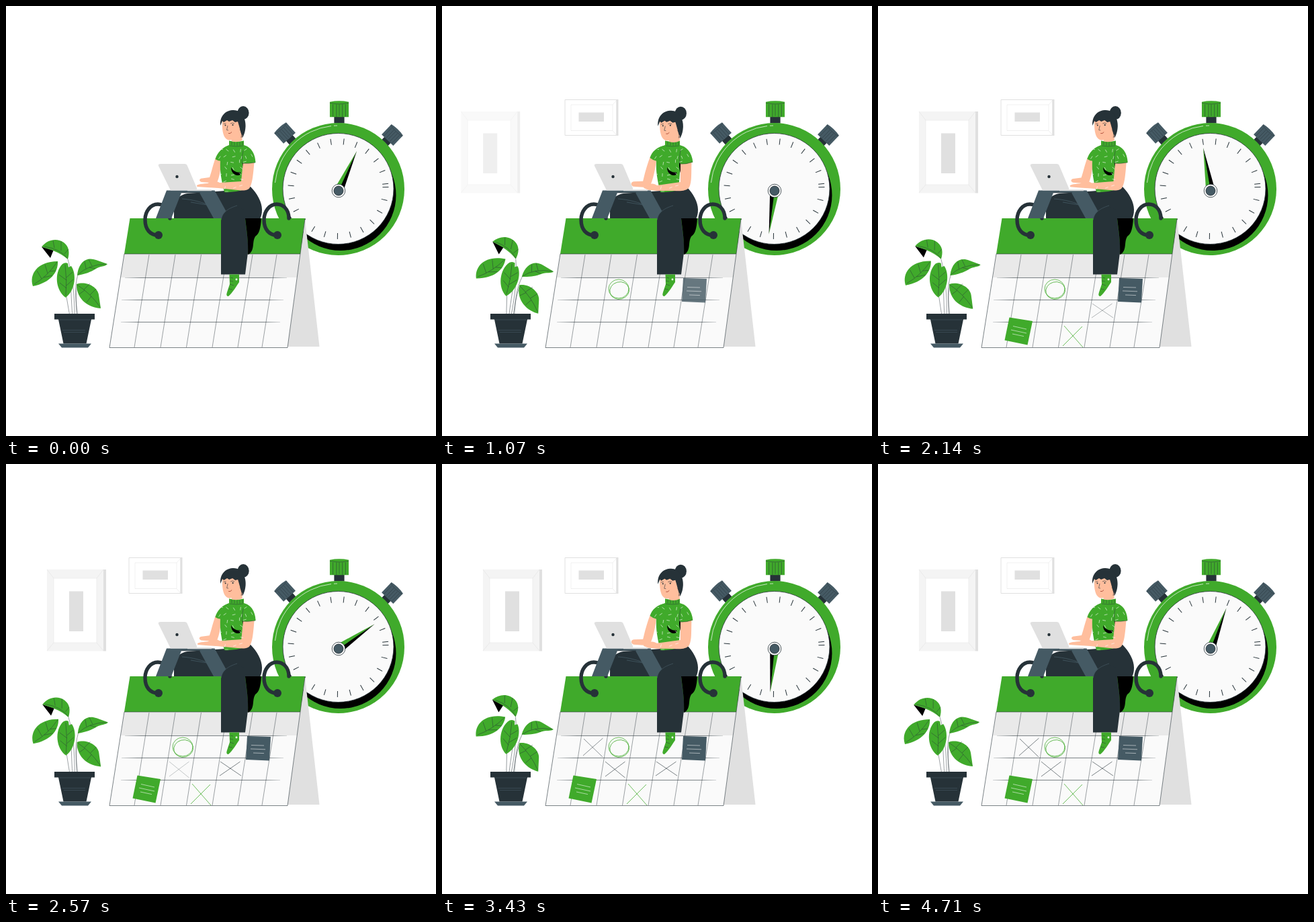
Animation, 640 px wide and 640 px high, one loop 4.78 s. Source, as an HTML page:

```html
<!DOCTYPE html>
<html lang="en">
<head>
<meta charset="utf-8">
<title>Planning the week</title>
<style>
html, body { margin: 0; width: 100%; height: 100%; overflow: hidden; background: #fff; }
svg { display: block; width: 100%; height: 100%; }
.green { fill: #40aa2b; }
.dark { fill: #263238; }
.slate { fill: #455a64; }
.skin { fill: #ffbe9d; }
.grey { fill: #e0e0e0; }
.line { fill: none; stroke: #263238; stroke-width: .6; }
.thin { fill: none; stroke: #263238; stroke-width: .45; }
.pen { fill: none; stroke: #40aa2b; stroke-width: .75; }
.white { fill: none; stroke: #fff; stroke-width: .7; }
.pale { fill: none; stroke: #e0e0e0; stroke-width: .8; }
.ring { fill: none; stroke: #263238; stroke-width: 5.4; stroke-linecap: round; }
</style>
</head>
<body>
<svg viewBox="0 0 640 640">
  <defs>
    <g id="cap">
      <path class="dark" d="M-6.5 8h13v11h-13z"/>
      <path d="M-12-10.500Q0-13 12-10.500V10.500H-12z"/>
      <path class="thin" d="M-12-9Q0-6 12-9M-8-7V10M-3.500-7V10.500M0-7V9M4-7V10.500M8-7V10"/>
    </g>
    <g id="hook">
      <path class="ring" d="M421 316C421 302 412 295 403 295C392 295 384 306 384 318C384 333 392 341 403 341"/>
      <circle class="dark" cx="404" cy="341" r="6"/>
    </g>
    <clipPath id="shirtClip"><path d="M332 207C322 210 314 219 312 228L319 231C318 246 321 262 325 277L352 274L355 234L371 232C371 222 367 211 354 207z"/></clipPath>
    <linearGradient id="rule"><stop offset="0" stop-color="#263238" stop-opacity=".3"/><stop offset=".1" stop-color="#263238"/><stop offset=".9" stop-color="#263238"/><stop offset="1" stop-color="#263238" stop-opacity=".3"/></linearGradient>
  </defs>

  <g id="tall">
    <path fill="#f4f4f4" d="M61 157h84v121.500h-84z"/>
    <path class="grey" d="M145 157h4v121.500h-4z"/>
    <path class="pale" stroke-opacity=".7" d="M61 157l10 13M145 157l-10 13M61 278l10-12M145 278l-10-12"/>
    <path fill="#fff" stroke="#ebebeb" stroke-width=".8" d="M71 170h64v96h-64z"/>
    <path class="grey" d="M94 189.500h21v59.500h-21z"/>
  </g>
  <g id="wide">
    <path fill="#fff" stroke="#e0e0e0" d="M183 139.500h77v53h-77z"/>
    <path class="grey" d="M259.500 139h3v54h-3z"/>
    <path class="pale" stroke-opacity=".6" d="M192 147h62v38.500h-62zM254 147l6-7M254 185.500l6 7"/>
    <path class="grey" d="M203.500 158.500h37.500v13.500h-37.500z"/>
  </g>

  <g id="watch">
    <use href="#cap" class="green" transform="translate(496 154) scale(1.17 1.08)"/>
    <use href="#cap" class="slate" transform="translate(415 189) rotate(-42)"/>
    <use href="#cap" class="slate" transform="translate(575 192) rotate(44)"/>
    <circle class="green" cx="494.500" cy="272.500" r="98.500"/>
    <path class="white" d="M400.500 263A94.500 94.500 0 0 1 484 178.600M488 178.200l5-.2"/>
    <circle cx="498" cy="281.500" r="82.500"/>
    <circle cx="494.500" cy="272" r="82.500" fill="#fafafa" stroke="#263238" stroke-width=".8"/>
    <g id="ticks" stroke="#263238" stroke-width="1"></g>
    <g id="hand">
      <path class="green" d="M0-65L-6.500-3H1z"/>
      <path d="M0-65L6.500-3H0z"/>
    </g>
    <circle cx="495" cy="275" r="9.800" fill="#fff" stroke="#263238" stroke-width=".8"/>
    <circle class="slate" cx="495" cy="275" r="7" stroke="#263238" stroke-width=".9"/>
  </g>

  <g id="calendar">
    <path class="grey" d="M445 317L466.500 507H419z"/>
    <path fill="#fafafa" d="M176 369H438L419 508.500H154z"/>
    <path fill="#e9e9e9" d="M176 369H438L433 404H171z"/>
    <path class="green" d="M184.500 316H445L438 369H176z"/>
    <path class="line" d="M176 369H438M445 317L419 508.500H154L176 369"/>
    <g id="grid" class="thin"></g>
  </g>

  <g id="ring">
    <ellipse class="pen" cx="263" cy="421" rx="15" ry="14"/>
    <ellipse class="pen" cx="264" cy="423.500" rx="14.500" ry="12.800" transform="rotate(-15 264 423)"/>
  </g>
  <g id="slateNote">
    <path class="slate" d="M359 405L394 406L392 441.500L357 440z"/>
    <path class="white" stroke-opacity=".75" d="M365 418.500l19 .5M364 424l22 .8M368 430l16 .6"/>
  </g>
  <g id="greenNote">
    <path class="green" d="M195.500 463.500L230 469L222.500 504.500L188.500 497.500z"/>
    <path class="white" stroke-opacity=".8" d="M201 476.500l20 4.500M198 482l23 5M200 488l17 3.600"/>
  </g>
  <path id="x1" class="pen" d="M277 476L305 508M304 477L275 506"/>
  <path id="x2" class="line" d="M319 443L350 464M348.500 443L318 464"/>
  <path id="x3" class="line" d="M243 443L272.500 467M272.500 443L243 465"/>
  <path id="x4" class="line" d="M211 409L239 436M239.500 408L210 434"/>

  <g id="woman">
    <use href="#hook" x="-177"/>
    <path class="dark" d="M250 316V302C251 288 258 281 270 279L326 275L364 269C374 279 381 292 381 303C381 309 380 313 378 317H356C358 335 361 350 360 367L356 399.500H320V330C320 322 322 318 327 314V316z"/>
    <path d="M356 316H380C379 331 377 339 371 343C367 349 369 358 366 364C364 368 362 369 360 370C361 350 358 334 356 316z"/>
    <path fill="none" stroke="#455a64" stroke-width=".8" d="M262 287C278 288 292 292 309 299M275 292l24 4"/>
    <path class="green" d="M332.500 399.500H347V411C342 418 338 426 331 432Q327 432 329 426L333 414z"/>
    <path class="thin" d="M334 404l4 1M333 409l5 1M333 414l6 2M331 421l6 1"/>
    <circle cx="343" cy="407" r="1.400" fill="#fff"/>
    <path class="slate" d="M239 274.500H310.500L330 310V316H309L288 278H261L246 316H223z"/>
    <path class="dark" opacity=".5" d="M261 277h28v1.500h-28z"/>
    <path class="dark" d="M320 332V320C321 309 328 302 342 298L356 304V332z"/>
    <path fill="none" stroke="#455a64" stroke-width=".7" d="M320.500 318C321 309 328 302 344 297"/>
    <use href="#hook"/>
    <path class="grey" d="M227 238Q226 235 230 235H266Q269 235 270 238L284 271Q285 274 282 274.500H245z"/>
    <path class="grey" d="M270 273h36v2.200h-36z"/>
    <circle class="dark" cx="254.500" cy="254" r="2.200"/>

    <path id="farArm" class="skin"/>
    <path class="green" d="M332 200.500Q343 203 354 200.500V207C362 212 358 228 355 236L352 274Q338 278 325 277C321 262 318 246 319 231C319 219 322 211 332 207z"/>
    <path id="farSleeve" class="green"/>
    <path id="fold"/>
    <path d="M335 240C338 246 343 248 349 247.500C350 251 347 252.500 344 252C338 251 335 246 335 240z"/>
    <path id="nearArm" class="skin"/>
    <path id="nearSleeve" class="green"/>
    <g id="dashes" class="white" stroke-opacity=".85" stroke-linecap="round" clip-path="url(#shirtClip)"></g>
    <path class="thin" d="M336 202v5M340 202.500v5M344 203v5M348 202.500v5M352 202v5M333 208q10 2 20 0"/>
    <path id="sleeveLine" class="thin"/>

    <g id="head">
      <ellipse class="dark" cx="353" cy="159" rx="8.600" ry="10"/>
      <path class="dark" d="M340 156C353 156 357 170 356.500 180C356 188 354 192 352 196L346 192L338 172z"/>
      <path class="skin" d="M322 168C321 183 323 193 327 197C330 200 333 200 335.500 199V201Q343 204 351.500 200V192C349 190 348 182 348 170z"/>
      <path class="dark" d="M319 178C318 163 327 155 339 155C350 155 354 164 355 174L350 188C348 184 347 178 345 172L341 173L337 170L332 172L329 170L324 173L322 171z"/>
      <path class="line" d="M323.500 175.500l4-.8M334 175q3-2 6 0M330 178l-1.500 6.500l2.500 .5M348 184q4 4 2 12"/>
      <path fill="none" stroke="#b5543f" stroke-width="1" d="M331 189.500q3 1 5-2"/>
      <circle class="dark" cx="326.500" cy="177.500" r="1"/>
      <circle class="dark" cx="337.500" cy="177" r="1.100"/>
    </g>
  </g>

  <g id="plant">
    <path class="thin" d="M92 377C99 400 102 430 102 462M90 433L95 462M94 388C97 415 97 440 99 462M107 400C101 420 104 440 107 462M106 415C103 430 105 445 105 462"/>
    <path class="green" d="M53 358.500C62 347 76 345 86 352C94 358 95 367 92 377Q83 369 70 364z"/>
    <path d="M53 358.500L70.500 364L66 375z"/>
    <path class="green" d="M40 417C34 400 46 380 77 380C78 396 66 412 40 417z"/>
    <path class="green" d="M89 434C74 424 71 397 84 384Q88 381 92 383L93 389L97 387C105 398 104 422 89 434z"/>
    <path class="green" d="M106 401C108 380 121 373 134 378L151 384C148 388 140 387 134 391C126 396 118 399 106 401z"/>
    <path class="green" d="M105 414C118 409 136 417 138 430L141 450C125 449 105 439 105 414z"/>
    <path class="thin" d="M92 376Q80 361 57 358M82 364v-14M72 360l-2-11M87 369l6-7M42 414Q62 402 76 381M53 406l-7-12M62 398l-4-13M56 404l13-3M65 395l9-1M89 431Q91 408 88 385M90 420l-10-8M90 408l-11-8M90 416l10-9M90 404l9-8M107 400Q122 385 149 384M119 391l-2-11M128 387l-5-10M124 389l9 2M106 415Q126 428 140 448M116 422l9-9M125 430l9-9M117 423l-8 6M127 432l-7 9"/>
  </g>
  <g id="pot">
    <path class="dark" d="M72 458h60v8.500h-5L119.500 502.500H85.500L78 466.500h-6z"/>
    <path class="slate" d="M78 502.500h49l-5 6H83z"/>
    <path fill="none" stroke="#455a64" stroke-width=".6" d="M84 482.500h34M86 485.500h32M79 467h47"/>
  </g>
</svg>

<script>
const LOOP = 4780, FPS = 14;
const $ = id => document.getElementById(id);
const lineTag = (x1, y1, x2, y2, extra = '') =>
  `<line x1="${x1}" y1="${y1}" x2="${x2}" y2="${y2}" ${extra}/>`;

// Dial marks: the row starts at the right and stops just short of a full turn
const TICKS = 24, FIRST = 88, STEP = 15.48;
$('ticks').innerHTML = Array.from({ length: TICKS }, (_, i) =>
  lineTag(494.5, 197, 494.5, 206, `transform="rotate(${FIRST + i * STEP} 494.5 272)"`)).join('');

// Calendar rules
$('grid').innerHTML =
  [213, 252, 290.5, 329, 367, 403].map(x => lineTag(x, 370, x - 22, 508)).join('') +
  [[177, 418, 404], [172, 413, 437], [171, 408, 470]].map(([a, b, y]) =>
    `<rect x="${a}" y="${y}" width="${b - a}" height=".6" fill="url(#rule)" stroke="none"/>`).join('');

// Knit pattern, one dash per jittered cell
let seed = 7;
const rnd = () => (seed = seed * 16807 % 2147483647) / 2147483647;
let dashes = '';
for (let y = 212; y < 276; y += 9) {
  for (let x = 315; x < 372; x += 10) {
    if (y > 232 && x > 350) continue;
    const a = rnd() * Math.PI, px = x + rnd() * 6, py = y + rnd() * 5;
    const dx = 2 * Math.cos(a), dy = 2 * Math.sin(a);
    dashes += lineTag(px - dx, py - dy, px + dx, py + dy);
  }
}
$('dashes').innerHTML = dashes;

// Paths that blend between two poses
const poses = {
  farArm: [
    'M312 226L320 230C320 245 317 257 313 265L304 263L291 262C287 261 287 257 292 256.500L303 255C306 247 308 236 312 226z',
    'M310 224L319 230C317 245 314 258 310 267L300 270L285 269C281 268 280 262 285 261.500L299 261C302 248 306 234 310 224z'
  ],
  farSleeve: [
    'M334 207C322 209 314 219 311.500 228Q316 231 321 231L328 215z',
    'M334 207C320 209 312 217 309.500 226Q314 230 320 231L328 215z'
  ],
  fold: [
    'M352 233L355 234L354 243Q352 240 352 233z',
    'M353 233L357 235L356 251Q353 245 353 233z'
  ],
  nearArm: [
    'M353 232L369.500 232C368 250 367 262 363 270C360 275 354 275 345 274L316 271L300 270L285 269C282 267 285 265 300 264L308 260C312 260 316 262 318 263L350 261z',
    'M355 232L371.500 232C371 250 372 262 368 270C364 275 356 276 345 275L320 275L308 274L301 271C300 269 301 268 304 267L310 265C314 264 317 265 320 267L355 262z'
  ],
  nearSleeve: [
    'M352 207C364 208 371 219 371.500 233Q361 235 351 234L353 216z',
    'M352 207C364 208 372 218 373.500 232.500Q363 236 354 235L354 216z'
  ],
  sleeveLine: [
    'M353 215Q351 224 351 234Q361 235 371 233',
    'M355 214Q353 224 354 235Q363 236 373 232'
  ]
};
const NUM = /-?\d+(?:\.\d+)?/g;
function blend([from, to], s) {
  const end = to.match(NUM);
  let i = 0;
  return from.replace(NUM, n => (+n + (end[i++] - n) * s).toFixed(2));
}

// id, start ms, duration ms, entry offset x, y
const entries = [
  ['wide', 250, 500, 0, -38.4],
  ['ring', 430, 480, 0, 0],
  ['slateNote', 680, 480, 0, 0],
  ['tall', 820, 500, -66, 0],
  ['greenNote', 1220, 480, 0, 0],
  ['x1', 1600, 480, 0, 0],
  ['x2', 1860, 480, 0, 0],
  ['x3', 2360, 480, 0, 0],
  ['x4', 3010, 480, 0, 0]
];

function draw(t) {
  const sway = (1 - Math.cos(4 * Math.PI * t / LOOP)) / 2;
  $('hand').setAttribute('transform', `translate(495 275) rotate(${24.6 + .152 * t})`);
  $('plant').setAttribute('transform', `rotate(${11.8 * sway} 103 465)`);
  $('head').setAttribute('transform', `translate(${2.4 * sway} ${.7 * sway})`);
  for (const id in poses) $(id).setAttribute('d', blend(poses[id], sway));
  for (const [id, start, time, dx, dy] of entries) {
    const p = Math.min(1, Math.max(0, (t - start) / time));
    $(id).setAttribute('opacity', p);
    $(id).setAttribute('transform', `translate(${dx * (1 - p)} ${dy * (1 - p)})`);
  }
}

const begin = performance.now();
function loop() {
  const t = (performance.now() - begin) % LOOP;
  draw(Math.floor((t + 6) * FPS / 1000) * 1000 / FPS);
  requestAnimationFrame(loop);
}
loop();
</script>
</body>
</html>
```
